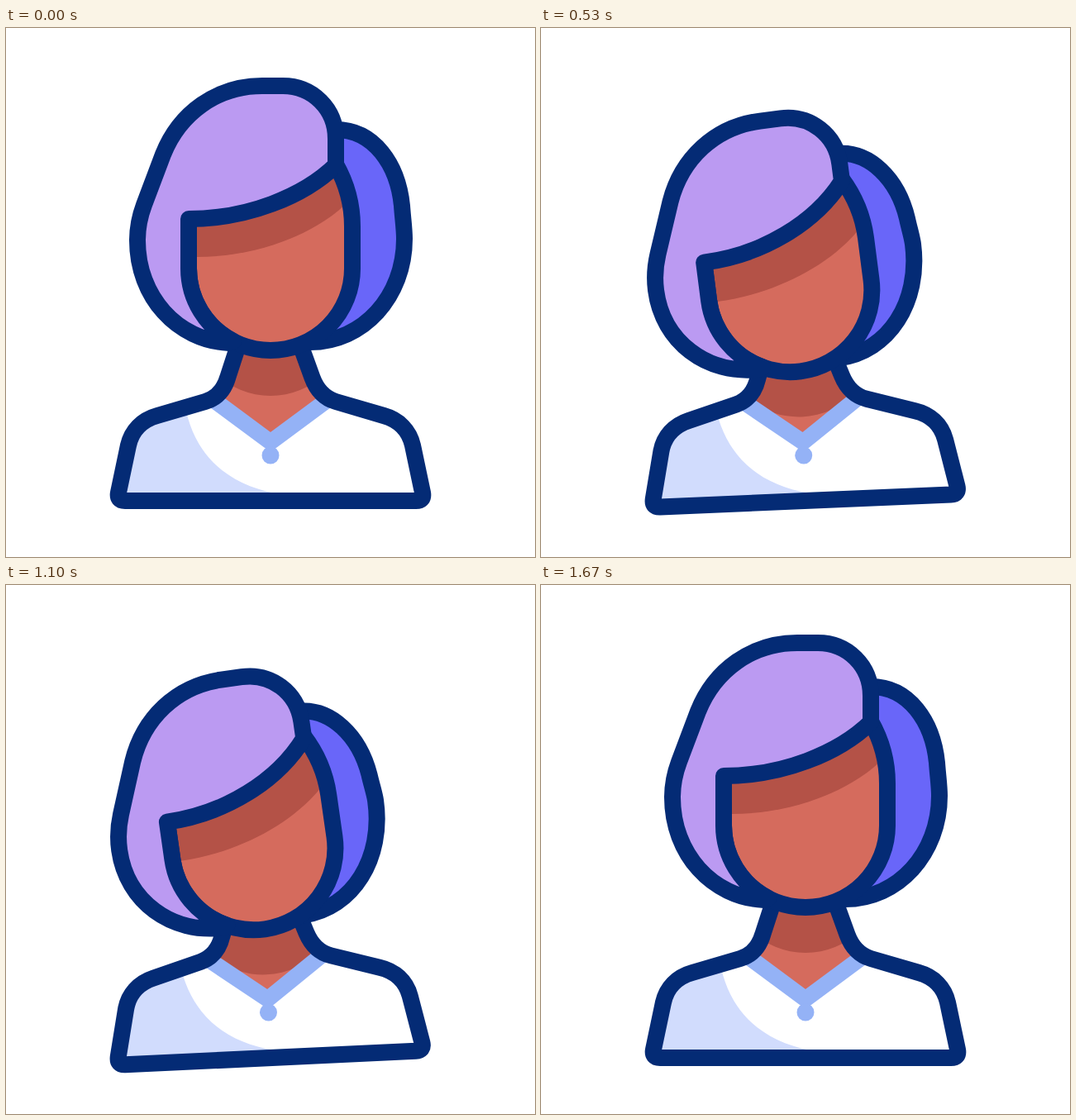
These frames come from a looping animation (640 by 640 pixels, 2 s). An HTML page:

```html
<!DOCTYPE html>
<html lang="en">
<head>
<meta charset="utf-8">
<title>Tilting head</title>
<style>
html, body { margin: 0; width: 100%; height: 100%; overflow: hidden; background: #fff; }
svg { display: block; width: 100%; height: 100%; }
.line { stroke: #042b75; stroke-width: 20; stroke-linejoin: round; }
</style>
</head>
<body>
<svg viewBox="0 0 640 640">
  <defs>
    <path id="torsoShape" d="M288 362L268.500 422C264 438 254 448 241 452L183 469C165 474 152 487 148 505L136 562Q134 572 144 572H496Q506 572 504 562L492 505C488 487 475 474 457 469L399 452C386 448 376 438 370.500 423L347 358"/>
    <path id="neckShape" d="M288 362L268 424Q262 440 250 450L320 501L390 450Q378 440 371 424L347 358Z"/>
    <path id="faceShape" d="M221 231V291A99 99 0 0 0 419 291V240C419 212 412 188 399 165"/>
    <clipPath id="torsoClip"><use href="#torsoShape"/></clipPath>
    <clipPath id="neckClip"><use href="#neckShape"/></clipPath>
    <clipPath id="faceClip"><use href="#faceShape"/></clipPath>
  </defs>
  <g id="body">
    <use href="#torsoShape" fill="#fff"/>
    <path clip-path="url(#torsoClip)" fill="#d1dcfd" d="M120 440H214C222 515 265 550 325 563V590H120Z"/>
    <use href="#neckShape" fill="#d56b5d"/>
    <g clip-path="url(#neckClip)"><circle id="neckShade" cx="320" cy="350" r="95" fill="#b45247"/></g>
    <path d="M247 447L320 501L393 447" fill="none" stroke="#94b2f6" stroke-width="19.500"/>
    <circle cx="320" cy="517" r="10.500" fill="#94b2f6"/>
    <use href="#torsoShape" class="line" fill="none"/>
    <g id="head">
      <path id="backHair" class="line" fill="#6966f9"/>
      <use href="#faceShape" fill="#d56b5d"/>
      <g clip-path="url(#faceClip)">
        <path id="faceShade" fill="#b45247" d="M200 100H440V182L409 215C365 255 295 277 231 277H200Z"/>
      </g>
      <use href="#faceShape" class="line" fill="none"/>
      <path id="frontHair" class="line" fill="#bb9af2"/>
    </g>
  </g>
</svg>
<script>
const el = id => document.getElementById(id);
const set = (id, name, value) => el(id).setAttribute(name, value);

// Key poses at 30 frames per second: [frame, tilt, nod]
const keys = [[0, 0, 0], [12, -1, 1], [24.1, 1, 0], [37, -1, 1], [50, 0, 0], [60, 0, 0]];

function pose(frame) {
  const i = keys.findIndex(k => k[0] > frame);
  const a = keys[i - 1], b = keys[i];
  const p = (frame - a[0]) / (b[0] - a[0]);
  const q = p * p * (3 - 2 * p);
  return [1, 2].map(n => a[n] + (b[n] - a[n]) * q);
}

function draw(now) {
  const frame = Math.floor((now % 2000 + 4) * 0.03) % 60;
  const [tilt, nod] = pose(frame);
  const d = 18 * nod, x = -10 * nod;

  set('body', 'transform', `rotate(${5 * tilt} 320 571)`);
  set('head', 'transform', `rotate(${10 * tilt} 320 408) translate(0 ${34 * nod})`);
  set('neckShade', 'transform', `translate(0 ${34 * nod})`);
  set('faceShade', 'transform', `translate(0 ${22 * nod})`);

  // With the nod the crown and fringe sink and the back hair slides inwards.
  set('backHair', 'd', `M${399 + x * 0.6} ${123 + d * 0.85}
    C${445 + x} ${123 + d * 0.85} ${474 + x} ${165 + d * 0.8} ${479 + x} ${215 + d * 0.6}
    C${480 + x} ${230 + d * 0.4} ${482 + x} ${243 + d * 0.2} ${482 + x} 255
    C${482 + x} 325 ${432 + x * 0.4} 380 368 380Z`);
  set('frontHair', 'd', `M221 ${231 + d}C292 ${231 + d} 360 ${204 + d * 0.8} 399 ${166 + d * 0.15}
    V${134 + d}C399 ${98 + d} 371 ${70 + d} 335 ${70 + d}H310
    C255 ${70 + d} 210 ${103 + d} 190 ${153 + d}L167 ${214 + d}
    C161 ${230 + d} 159 ${243 + d} 159 ${257 + d}
    C159 ${325 + d * 0.6} 207 ${378 + d * 0.15} 270 381L275 379A99 99 0 0 1 221 291Z`);
}

const start = performance.now();
function loop() {
  draw(performance.now() - start);
  requestAnimationFrame(loop);
}
loop();
</script>
</body>
</html>
```
